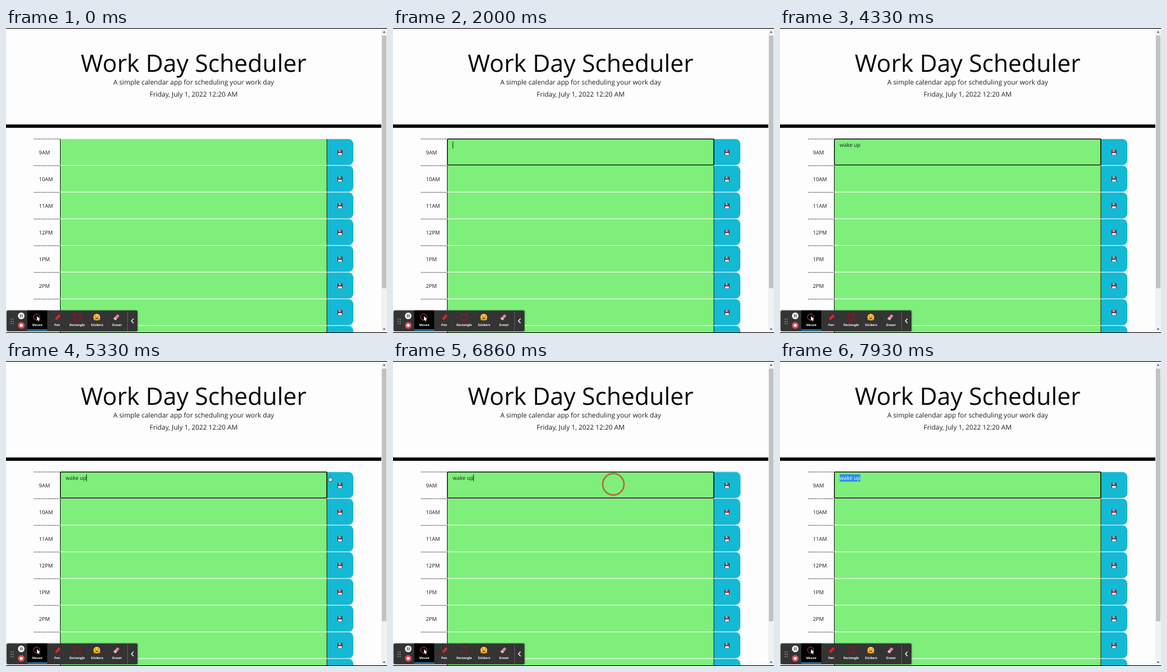
An HTML page that plays this animation: 600x480 px, repeating every 8000 ms.

```html
<!DOCTYPE html>
<html lang="en">
<head>
<meta charset="utf-8">
<title>Work Day Scheduler</title>
<style>
  html, body { margin: 0; width: 100%; height: 100%; overflow: hidden; background: #fdfdfd; }
  svg { display: block; }
  text { font-family: "Open Sans", "Noto Sans", sans-serif; fill: #1c1f22; white-space: pre; text-rendering: geometricPrecision; }
  .mid { text-anchor: middle; }
  .lead { font-size: 10.5px; }
  .hour, .entry { font-size: 8.4px; }
  .tool { font-size: 4.9px; font-weight: 700; fill: #fff; }
</style>
</head>
<body>
<svg width="600" height="480" viewBox="0 0 600 480">
  <defs>
    <clipPath id="selClip"><rect id="selArea" y="176" height="16"/></clipPath>
    <g id="floppy">
      <rect x="-4" y="-4" width="8" height="8" rx=".7" fill="#3a3048"/>
      <rect x="-2.3" y="-4" width="4.6" height="3.2" fill="#c3b4c0"/>
      <rect x=".5" y="-3.6" width="1.2" height="2.3" fill="#4b2c40"/>
      <rect x="-3" y=".3" width="6" height="3.7" fill="#f6eef2"/>
      <rect x="-3" y=".3" width="6" height=".9" fill="#c8485c"/>
    </g>
  </defs>
  <rect width="600" height="480" fill="#fdfdfd"/>

  <text class="mid" x="295.5" y="68.7" font-size="37.8" style="fill:#050505">Work Day Scheduler</text>
  <text class="mid lead" x="295.5" y="89.3">A simple calendar app for scheduling your work day</text>
  <text class="mid lead" x="295.5" y="108.3">Friday, July 1, 2022 12:20 AM</text>
  <rect y="151.8" width="591" height="5.3" fill="#000"/>

  <g id="rows"></g>
  <path id="ring" d="M505.5 174H540a8 8 0 0 1 8 8V208.2a8 8 0 0 1-8 8H505.5" fill="none" stroke="#9bdbe8" stroke-width="1.6"/>
  <rect id="outline" x="85.6" y="174.7" width="419.7" height="40.9" rx="1.2" fill="none" stroke="#000" stroke-width="1.2"/>
  <text id="entry" class="entry" x="94" y="187">wake up</text>
  <g clip-path="url(#selClip)">
    <rect x="94" y="178.3" width="40" height="11.5" fill="#2d8ceb"/>
    <text class="entry" x="94" y="187" style="fill:#fff">wake up</text>
  </g>
  <rect id="caret" y="178.5" width=".9" height="11" fill="#111"/>

  <rect x="591" width="9" height="480" fill="#f1f1f1"/>
  <rect x="592" y="12" width="7" height="397.5" fill="#c1c1c1"/>
  <path d="M593.4 7.4l2.1-2.6 2.1 2.6zM593.4 473l2.1 2.6 2.1-2.6z" fill="#505050"/>
  <path d="M0 .5H600M0 479.5H600" stroke="#000"/>

  <g id="toolbar">
    <rect y="443.6" width="208.5" height="35" rx="3" fill="#000" opacity=".2"/>
    <rect x="1" y="444.6" width="206" height="32.6" rx="2.5" fill="#343434"/>
    <path d="M8.3 457.5v9M11.3 457.5v9" stroke="#bbb" stroke-width="1.3" stroke-dasharray="1.3 2.3"/>
    <circle cx="24" cy="453" r="5.2" fill="#f4f4f4"/>
    <path d="M22.7 450.6v4.8M25.3 450.6v4.8" stroke="#333" stroke-width="1.1"/>
    <circle cx="24" cy="468" r="5.2" fill="#df4f58"/>
    <rect x="21.9" y="465.9" width="4.2" height="4.2" rx=".5" fill="#fff"/>
    <rect x="33.5" y="444.6" width="31.5" height="31.6" fill="#000"/>
    <rect x="33.5" y="474.5" width="31.5" height="1.7" fill="#2a9fe0"/>
    <circle cx="48.3" cy="454.8" r="4.8" fill="none" stroke="#c94a4a" stroke-width="1"/>
    <path d="M48.8 453.6l5.2 5-2.5.2 1.2 2.3-1.2.6-1.1-2.4-1.6 1.4z" fill="#fff"/>
    <path d="M76.8 460.3l1.2-4 5.3-5.7 2.7 2.5-5.3 5.8z" fill="#e0242c"/>
    <path d="M76.8 460.3l.7-2.4 1.7 1.6z" fill="#74151a"/>
    <rect x="107.4" y="450.4" width="9.4" height="9.4" fill="none" stroke="#ab101c" stroke-width="1.1"/>
    <circle cx="143" cy="455" r="5.3" fill="#fcc83a"/>
    <path d="M140 453.6h1.7M144.3 453.6h1.7" stroke="#62420f" stroke-width="1"/>
    <path d="M140.5 455.8h5q-.6 2.2-2.5 2.2t-2.5-2.2z" fill="#7b3d18"/>
    <path d="M138.8 458.6h2.6M144.6 458.6h2.6" stroke="#e58f22" stroke-width="2.4" stroke-linecap="round"/>
    <path d="M169.2 457.4l6-7 3.5 2.5-6 7.2z" fill="#dc8a9d"/>
    <path d="M169.2 457.4l1.8-2.1 3.5 2.6-1.8 2.2z" fill="#f0bfc8"/>
    <path d="M191.5 446v31" stroke="#686868" stroke-width=".8"/>
    <path d="M200.8 457.5l-3.3 3.5 3.3 3.5" fill="none" stroke="#fff" stroke-width="1.2"/>
  </g>

  <circle id="click" r="16.8" fill="none" stroke="#c8382a" stroke-opacity=".75" stroke-width="2.3"/>
  <path id="hand" d="M-1.6 4.2L-3.2 1.3Q-3-.1-1.4.9V-4Q-.8-5 0-4V-1.2L2.6-.6Q3.4 0 3.2 1.5L2.6 4.2z" fill="#fff" stroke="#222" stroke-width=".6"/>
</svg>
<script>
const LOOP = 8000, BLINK = 530, TEXT_X = 94, PHRASE = "wake up";
const $ = id => document.getElementById(id);
const show = (id, on) => $(id).setAttribute("visibility", on ? "visible" : "hidden");

// The last two rows have their labels behind the toolbar
const hours = ["9AM", "10AM", "11AM", "12PM", "1PM", "2PM", "", ""];
$("rows").innerHTML = hours.map((hour, i) => `<g transform="translate(0 ${174.2 + 42 * i})">
  <path d="M44 .5H85.5" stroke="#222" stroke-width=".9" stroke-dasharray="1.7 1.05"/>
  <text class="hour" x="51.7" y="24.7">${hour}</text>
  <rect x="85.5" y=".5" width="420" height="41" fill="#7eef7a"/>
  <path d="M505.5.5H539.5a7.5 7.5 0 0 1 7.5 7.5V34a7.5 7.5 0 0 1-7.5 7.5H505.5z" fill="#14b9d4"/>
  <path d="M85.5.5V41.5M505.3.5V41.5" stroke="#111" stroke-width=".9"/>
  <use href="#floppy" x="526" y="21.5"/></g>`).join("");

["Mouse", "Pen", "Rectangle", "Stickers", "Eraser"].forEach((name, i) => {
  $("toolbar").insertAdjacentHTML("beforeend",
    `<text class="tool mid" x="${49.3 + 31.4 * i}" y="469.3">${name}</text>`);
});

const edges = [...PHRASE, ""].map((_, n) =>
  TEXT_X + (n ? $("entry").getSubStringLength(0, n) : 0));

const FOCUS = 900, SAVE = 5950, REFOCUS = 6800, RELEASE = 7850;
const keys = [2530, 2660, 2800, 2930, 3060, 3560, 3780];
const handPath = [[5240, 503, 182], [5330, 510.5, 185], [5600, 527, 194], [6250, 527, 194], [6450, 503, 194]];
const dragPath = [[REFOCUS, 347, 194], [7080, 347, 194], [7600, 22, 190], [RELEASE, 22, 190]];
const clickPaths = [
  [[FOCUS, 300, 194], [FOCUS + 130, 300, 194]],
  [[SAVE, 526, 192], [SAVE + 130, 526, 192]],
  dragPath
];

// Position along a table of [time, x, y], or null outside its time span
function along(path, t) {
  for (let i = 1; i < path.length; i++) {
    const [t0, x0, y0] = path[i - 1], [t1, x1, y1] = path[i];
    if (t >= t0 && t < t1) {
      const k = (t - t0) / (t1 - t0), e = k * k * (3 - 2 * k);
      return [x0 + (x1 - x0) * e, y0 + (y1 - y0) * e];
    }
  }
  return null;
}

function place(id, point) {
  show(id, point);
  if (point) $(id).setAttribute("transform", `translate(${point})`);
}

function render(t) {
  const typed = keys.filter(k => k <= t).length;
  const focused = (t >= FOCUS && t < SAVE) || t >= REFOCUS;
  $("entry").textContent = PHRASE.slice(0, typed);
  show("outline", focused);

  const drag = along(dragPath, t);
  const pointer = t >= RELEASE ? 0 : drag ? drag[0] : 600;
  const end = edges[PHRASE.length];
  const start = edges.reduce((a, b) => Math.abs(b - pointer) < Math.abs(a - pointer) ? b : a);
  $("selArea").setAttribute("x", start);
  $("selArea").setAttribute("width", end - start);

  const reset = Math.max(0, ...[FOCUS, ...keys, REFOCUS].filter(k => k <= t));
  show("caret", focused && start === end && (t - reset) % (2 * BLINK) < BLINK);
  $("caret").setAttribute("x", edges[typed] - .2);

  const ringIn = (t - SAVE) / 150, ringOut = (REFOCUS + 150 - t) / 150;
  $("ring").setAttribute("opacity", Math.max(0, Math.min(1, ringIn, ringOut)));
  place("hand", along(handPath, t));
  place("click", clickPaths.map(p => along(p, t)).find(Boolean));
}

const began = performance.now();
function tick() {
  render((performance.now() - began) % LOOP);
  requestAnimationFrame(tick);
}
tick();
</script>
</body>
</html>
```
